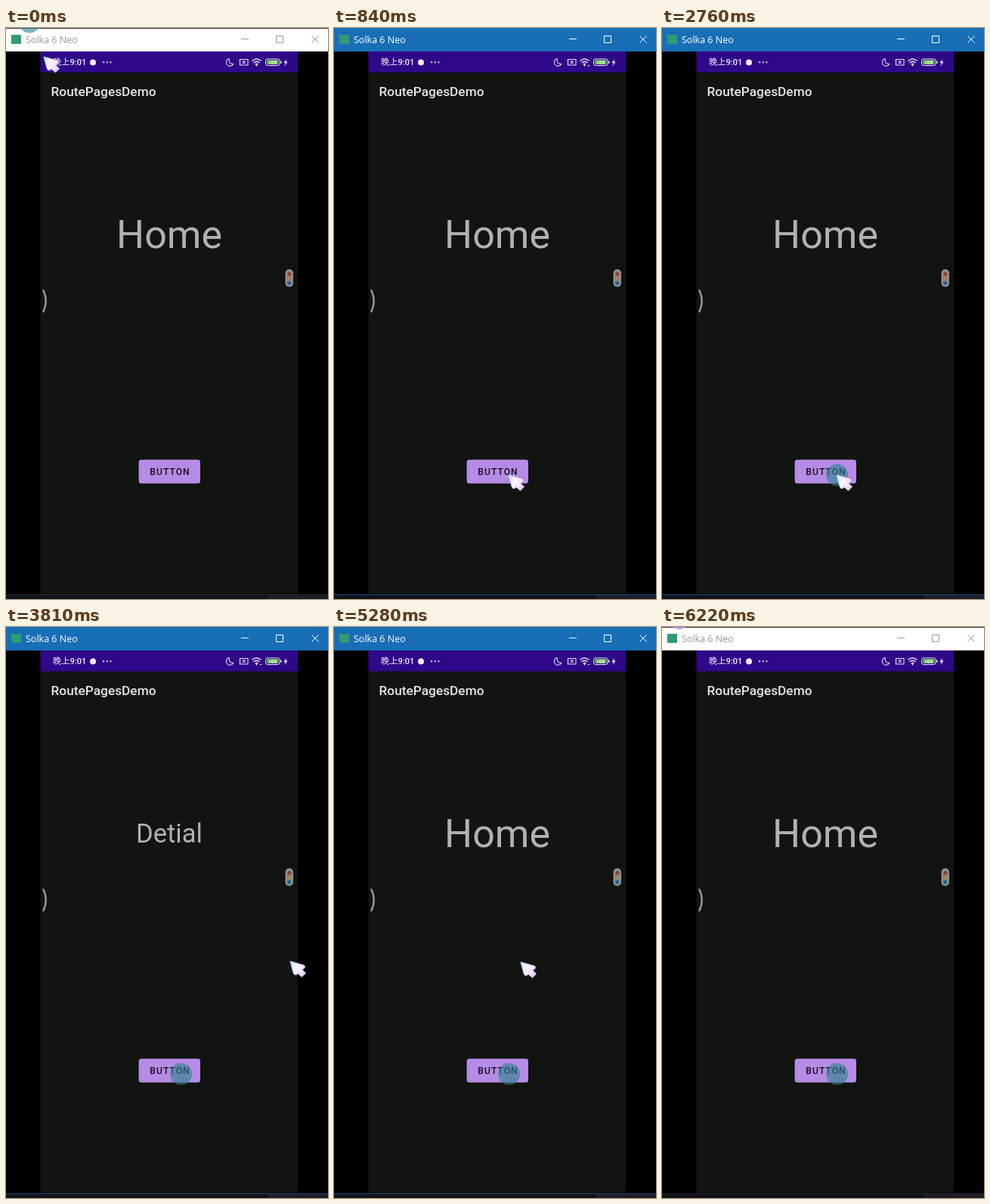
Animation of 426x755 px, one loop 6.34 s. Source, as an HTML page:

```html
<!DOCTYPE html>
<html lang="en">
<head>
<meta charset="utf-8">
<title>Page navigation</title>
<style>
  html, body { margin: 0; width: 100%; height: 100%; overflow: hidden; background: #000; }
  svg { display: block; width: 100vw; height: 100vh; }
  text { font-family: Roboto, sans-serif; }
  .caption { font: 12.5px "Open Sans", "Noto Sans", sans-serif; }
  .clock { font: 500 11.2px Roboto, "Noto Sans CJK SC", "Noto Sans CJK", sans-serif; }
  .line { fill: none; stroke: #e4def3; stroke-width: 1.1; }
  .wifi { stroke-width: 1.6; }
  .page { fill: #b0b2b0; text-anchor: middle; }
</style>
</head>
<body>
<svg viewBox="0 0 426 755">
  <defs>
    <linearGradient id="pearl" x1="0" y1=".3" x2="1" y2=".8">
      <stop offset="0" stop-color="#c9f0f6"/>
      <stop offset=".35" stop-color="#fdf3fb"/>
      <stop offset=".7" stop-color="#f3e2fa"/>
      <stop offset="1" stop-color="#e3c4f2"/>
    </linearGradient>
    <linearGradient id="rim" x1="0" y1=".7" x2="1" y2=".4">
      <stop offset="0" stop-color="#8fdce8"/>
      <stop offset=".5" stop-color="#cdb2ee"/>
      <stop offset="1" stop-color="#c6a2ea"/>
    </linearGradient>
  </defs>
  <rect width="426" height="755"/>

  <!-- window bar -->
  <rect id="bar" width="426" height="31"/>
  <rect id="edge" width="426" height="1" fill="#3c3c40"/>
  <rect x="7" y="9" width="13" height="12" fill="#2f9c74"/>
  <g id="chrome">
    <text class="caption" x="26" y="20">Solka 6 Neo</text>
    <path d="M311 14.5h10M357.5 10.5h9v9h-9zM404.5 10.5l9 9m0-9l-9 9" fill="none"/>
  </g>

  <!-- phone -->
  <rect x="45.600" y="31" width="340.400" height="718" fill="#111411"/>
  <rect x="45.600" y="31" width="340.400" height="27.700" fill="#30088a"/>
  <text class="clock" x="62" y="49" fill="#f1edfa">晚上9:01</text>
  <g fill="#f4f0fb">
    <circle cx="115" cy="45.500" r="4"/>
    <circle cx="129" cy="45.300" r="1.100"/>
    <circle cx="133.700" cy="45.300" r="1.100"/>
    <circle cx="138.400" cy="45.300" r="1.100"/>
  </g>
  <path class="line" d="M295 40.500a5 5 0 1 0 5.800 7q-6 .6-5.800-7z"/>
  <path class="line" d="M309.500 41.500h10.500v7.500h-10.500zM313 43.500l3.500 3.500m0-3.500l-3.500 3.500"/>
  <path class="line wifi" d="M325.500 43.500q6-5 12 0M327.500 46q4-3.200 8 0M329.700 48.200q1.800-1.200 3.600 0"/>
  <circle cx="331.500" cy="49.500" r="1" fill="#f4f0fb"/>
  <path id="traffic" d="M335.500 49h3l-1.500 2z" fill="#e4def3"/>
  <rect x="343.500" y="41" width="18.500" height="8.600" rx="2.500" fill="none" stroke="#eeeaf8"/>
  <rect x="345" y="42.500" width="15.500" height="5.600" rx="1" fill="#63b846"/>
  <path d="M363.700 43.500v3.500" stroke="#eeeaf8" stroke-width="1.300"/>
  <text x="352.700" y="47.700" font-size="6.500" font-weight="700" fill="#fff" text-anchor="middle">100</text>
  <path d="M371.300 41l-4 5h2.400l-1.200 4 4.200-5.300h-2.600z" fill="#f4f0fb"/>

  <text x="59.500" y="90" font-size="17.300" font-weight="500" fill="#e5e7e4">RoutePagesDemo</text>
  <text id="home" class="page" x="216" y="291.200" font-size="52">Home</text>
  <text id="detail" class="page" x="216" y="284.500" font-size="34.600">Detial</text>
  <rect x="175.600" y="570.800" width="81.400" height="31.400" rx="3.500" fill="#b58be5"/>
  <text x="217" y="591" font-size="12.100" font-weight="500" letter-spacing="1.080" text-anchor="middle" fill="#140d1c">BUTTON</text>

  <path d="M49.500 347q6.500 14 0 28" fill="none" stroke="#969896" stroke-width="2.500" stroke-linecap="round"/>
  <rect x="369.500" y="319" width="10.500" height="23.500" rx="5" fill="#8c8c8c"/>
  <circle cx="374.800" cy="325" r="2.600" fill="#9c3436"/>
  <circle cx="374.800" cy="331" r="2.600" fill="#a87e42"/>
  <circle cx="374.800" cy="337" r="2.600" fill="#21609a"/>

  <!-- strip under the window -->
  <rect y="749" width="426" height="6" fill="#10121a"/>
  <rect x="346" y="750" width="80" height="5" fill="#1c1e27"/>
  <rect id="base" y="749" width="426" height="1"/>

  <circle id="tap" r="14.500" fill="#2a858c" fill-opacity=".6"/>
  <circle id="glow" cx="23" cy="-11" r="14" fill="#b59ad8"/>
  <path id="cursor" d="M0 0L18 5Q21 6.500 19 8.700L16 11.200L20.700 15.700L15.500 20.700L9.800 16L8 18Q5 18.700 4 15Z"
    fill="url(#pearl)" stroke="url(#rim)" stroke-linejoin="round"/>
</svg>
<script>
const LOOP = 6340;
const $ = id => document.getElementById(id);

// bursts of redraws: first, last, count
const bursts = [
  [0, 0, 1], [60, 590, 7], [840, 1110, 4], [1300, 1900, 7], [1990, 2080, 2],
  [2280, 2560, 4], [2760, 2760, 1], [3410, 4010, 7], [4090, 4690, 7],
  [4800, 5080, 4], [5280, 5860, 7], [5950, 6220, 4]
];
const ticks = bursts.flatMap(([a, b, n]) =>
  Array.from({ length: n }, (_, i) => a + (b - a) * i / Math.max(1, n - 1)));

// pointer stops: time, x, y
const route = [
  [0, 50, 38], [590, 231, 591], [3500, 231, 591], [3810, 376, 442],
  [4090, 376, 442], [4690, 247, 443], [5280, 247, 443],
  [5600, 130, 620], [5860, 14, 738], [6130, 23, -24], [LOOP, 23, -24]
];
const ease = p => p * p * (3 - 2 * p);

function pointer(t) {
  const i = route.findIndex(k => k[0] > t);
  const [t0, x0, y0] = route[i - 1], [t1, x1, y1] = route[i];
  const p = ease((t - t0) / (t1 - t0));
  return [x0 + (x1 - x0) * p, y0 + (y1 - y0) * p];
}

const within = (t, ...spans) => spans.some(([a, b]) => t >= a && t < b);
const show = (id, on) => $(id).setAttribute("visibility", on ? "visible" : "hidden");
const paint = (id, color) => $(id).setAttribute("fill", color);

function draw(now) {
  const time = now % LOOP;
  const t = ticks.findLast(k => k <= time + 0.01);
  const active = within(t, [840, 6130]);
  const detail = within(t, [1500, 2370], [3510, 4800]);
  const ink = active ? "#fff" : "#999";

  paint("bar", active ? "#186eb7" : "#fff");
  paint("base", active ? "#174a78" : "#25262b");
  paint("chrome", ink);
  $("chrome").lastElementChild.setAttribute("stroke", ink);
  show("edge", !active);
  show("traffic", within(t, [840, 2760], [3410, 6130]));
  show("home", !detail);
  show("detail", detail);

  const atTop = t < 60;
  show("tap", atTop || t >= 1300);
  $("tap").setAttribute("transform", atTop ? "translate(31 -8)" : "translate(231.5 591)");
  show("glow", t >= 6219);
  $("cursor").setAttribute("transform", `translate(${pointer(t)})`);
}

const start = performance.now();
function frame() {
  draw(performance.now() - start);
  requestAnimationFrame(frame);
}
frame();
</script>
</body>
</html>
```
